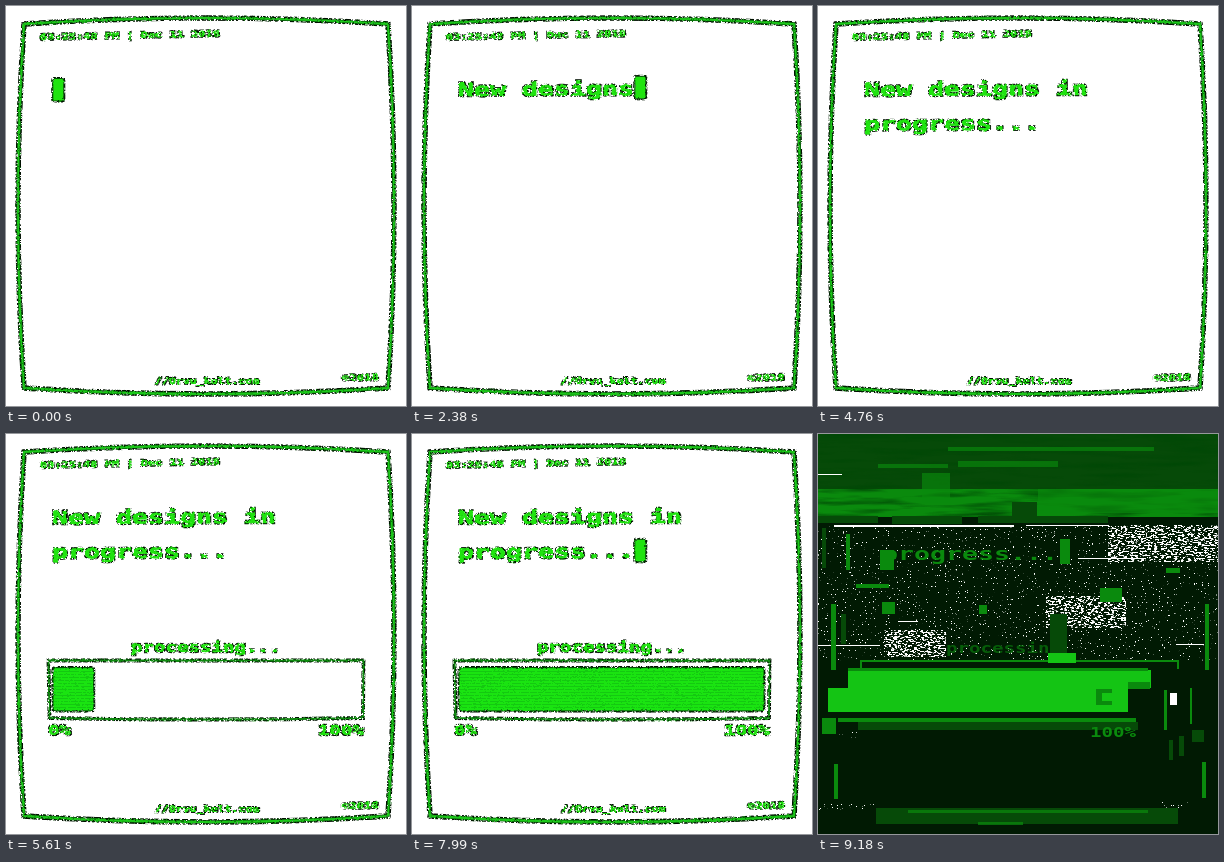
These frames come from a looping animation (400 by 400 pixels, 9350 ms). An HTML page without scripts:

```html
<!DOCTYPE html>
<html lang="en">
<head>
<meta charset="utf-8">
<title>Terminal progress</title>
<style>
@property --n { syntax: "<integer>"; inherits: true; initial-value: 0; }
html, body { margin: 0; width: 100%; height: 100%; overflow: hidden; background: #fff; }
svg { display: block; width: 100vw; height: 100vh; }

/* --n counts typed characters: 14 on line one, a space, 11 on line two */
#stage {
  --one: clamp(0, var(--n), 14);
  --two: clamp(0, var(--n) - 15, 11);
  --row: clamp(0, var(--n) - 14, 1);
  --col: (var(--one) * (1 - var(--row)) + var(--two) * var(--row));
  animation: type 9.35s infinite;
}
@keyframes type {
  0%, 9.08% { --n: -1; animation-timing-function: steps(21); }
  47.26%, 100% { --n: 27; }
}
text { font: bold 18.5px "DejaVu Sans Mono", monospace; white-space: pre; }
.w { transform: scaleX(1.437); }
.ink { fill: #20e410; }
.ink text { stroke: #20e410; stroke-width: .5; }
#clip1 rect { width: calc(16px * var(--one)); }
#clip2 rect { width: calc(16px * var(--two)); }
#cursor {
  transform: translate(calc(16px * var(--col)), calc(35px * var(--row) - .2px * var(--col)));
  animation: blink 9.35s step-end infinite;
}
@keyframes blink {
  0%, 9.08%, 52.72%, 63.63%, 74.54%, 85.45% { visibility: visible; }
  5.45%, 47.27%, 58.18%, 69.09%, 80%, 90.9%, 100% { visibility: hidden; }
}
#panel { animation: panel 9.35s step-end infinite; }
@keyframes panel { 0% { visibility: hidden; } 54.54%, 100% { visibility: visible; } }
#bar { animation: fill 9.35s infinite; }
@keyframes fill {
  0%, 56.34% { width: 0; animation-timing-function: step-end; }
  56.35% { width: 3px; animation-timing-function: steps(16); }
  85.44%, 100% { width: 305px; }
}
.glitch { animation: 9.35s step-end infinite; opacity: 0; }
#burst { animation-name: burst; }
#shift { animation-name: shift; }
#decay { animation-name: decay; }
@keyframes burst { 0%, 96.36%, 100% { opacity: 0; } 92.72% { opacity: 1; } }
@keyframes shift { 0%, 98.18%, 100% { opacity: 0; } 96.36% { opacity: 1; } }
@keyframes decay { 0% { opacity: 0; } 98.18%, 100% { opacity: 1; } }
.void { fill: #011a03; }
.deep { fill: #064a08; }
.mid { fill: #0a8a0d; }
.lit { fill: #14c414; }
</style>
</head>
<body>
<svg id="stage" viewBox="0 0 400 400">
<defs>
  <clipPath id="clip1"><rect x="46" y="64" height="36"/></clipPath>
  <clipPath id="clip2"><rect x="46" y="101" height="36"/></clipPath>
  <clipPath id="upper"><rect width="400" height="205"/></clipPath>
  <pattern id="scan" width="4" height="3" patternUnits="userSpaceOnUse">
    <rect width="4" height="3" fill="#1ae411"/><rect width="4" height="1" fill="#14c911"/>
  </pattern>

  <!-- ragged black rim that flickers -->
  <filter id="fuzz" filterUnits="userSpaceOnUse" x="0" y="0" width="400" height="400" color-interpolation-filters="sRGB">
    <feTurbulence type="fractalNoise" baseFrequency=".45" numOctaves="2" result="noise">
      <animate attributeName="seed" values="1;2;3;4;5" dur=".85s" calcMode="discrete" repeatCount="indefinite"/>
    </feTurbulence>
    <feColorMatrix in="noise" values="0 0 0 0 0  0 0 0 0 .06  0 0 0 0 0  14 0 0 0 -6.2" result="grain"/>
    <feMorphology in="SourceAlpha" operator="dilate" radius="1.4" result="wide"/>
    <feComposite in="grain" in2="wide" operator="in" result="rim"/>
    <feDisplacementMap in="SourceGraphic" in2="noise" scale="3" xChannelSelector="R" yChannelSelector="G" result="core"/>
    <feMerge><feMergeNode in="rim"/><feMergeNode in="core"/></feMerge>
  </filter>

  <!-- white specks: few, many -->
  <filter id="few" x="0" y="0" width="1" height="1" color-interpolation-filters="sRGB">
    <feTurbulence type="fractalNoise" baseFrequency=".63" numOctaves="2" seed="8"/>
    <feColorMatrix values="0 0 0 0 1  0 0 0 0 1  0 0 0 0 1  20 0 0 0 -14.2"/>
    <feComposite in2="SourceGraphic" operator="in"/>
  </filter>
  <filter id="many" x="0" y="0" width="1" height="1" color-interpolation-filters="sRGB">
    <feTurbulence type="fractalNoise" baseFrequency=".3 .7" numOctaves="2" seed="3"/>
    <feColorMatrix values="0 0 0 0 1  0 0 0 0 1  0 0 0 0 1  20 0 0 0 -10.4"/>
    <feComposite in2="SourceGraphic" operator="in"/>
  </filter>
  <!-- streaks smeared over green bands -->
  <filter id="smear" x="0" y="0" width="1" height="1" color-interpolation-filters="sRGB">
    <feTurbulence type="fractalNoise" baseFrequency=".015 .14" numOctaves="3" seed="5"/>
    <feColorMatrix values="0 0 0 0 0  0 0 0 0 .28  0 0 0 0 .02  2.4 0 0 0 -1.1"/>
    <feComposite in2="SourceGraphic" operator="in" result="dark"/>
    <feMerge><feMergeNode in="SourceGraphic"/><feMergeNode in="dark"/></feMerge>
  </filter>
  <path id="frame" d="M18 18Q200 6 382 18Q394 200 382 382Q200 394 18 382Q6 200 18 18Z" fill="none" stroke-linejoin="round"/>
</defs>

<rect width="400" height="400" fill="#fff"/>

<g filter="url(#fuzz)" class="ink">
  <use href="#frame" stroke="#075a08" stroke-width="3.4"/>
  <use href="#frame" stroke="#1cc81a" stroke-width="1.8"/>
  <g id="clock" transform="translate(34 34) rotate(-1.2) scale(.45)"><text class="w">03:25:48 PM | Dec 11 2018</text></g>
  <g transform="translate(149 378) scale(.435)"><text class="w">//Orvu_kelt.com</text></g>
  <g transform="translate(336 375) rotate(-1.3) scale(.46)"><text class="w">©2018</text></g>

  <g clip-path="url(#clip1)"><g transform="translate(46 90) rotate(-.3)"><text class="w">New designs in</text></g></g>
  <g clip-path="url(#clip2)"><g transform="translate(46 124.5) rotate(-.3)"><text class="w">progress...</text></g></g>
  <rect id="cursor" x="46.8" y="72.5" width="11" height="22.5" rx="2" stroke="#064a08"/>

  <g id="panel">
    <g transform="translate(125 218) scale(.72)"><text class="w">processing...</text></g>
    <path d="M42.5 226.5H357.5L357 284Q200 287 43.5 284Z" fill="none" stroke="#0f8a10" stroke-width="1.8"/>
    <rect id="bar" x="47" y="233.5" height="43.5" rx="3" fill="url(#scan)" stroke="#064a08"/>
    <g transform="translate(42 301) scale(.72)"><text class="w">0%</text></g>
    <g transform="translate(312 301) scale(.72)"><text class="w">100%</text></g>
  </g>
</g>

<g id="burst" class="glitch">
  <g id="torn">
    <rect class="void" width="400" height="400"/>
    <g fill="#fff">
      <rect width="335" height="32" filter="url(#many)"/>
      <path d="M100 4h64v24h-64zM230 0h92v24h-92zM34 14h34v12h-34z" opacity=".8"/>
      <rect x="40" y="32" width="290" height="18" filter="url(#few)"/>
      <path d="M378 0h22v32h-22z" filter="url(#many)"/>
      <rect x="12" y="206" width="365" height="17" filter="url(#many)"/>
      <path d="M28 208h85v10h-85zM270 210h80v8h-80z" opacity=".55"/>
      <rect x="14" y="223" width="374" height="36" filter="url(#few)"/>
      <rect x="40" y="268" width="350" height="74" filter="url(#few)"/>
      <rect x="66" y="293" width="62" height="26" filter="url(#many)"/>
    </g>
    <path class="deep" d="M337 0h11v54h-11zM363 0h10v54h-10zM0 45h115v7h-115zM125 40h95v12h-95z"/>
    <path class="mid" d="M115 51h285v10h-285zM0 66h400v10h-400z"/>
    <path class="lit" d="M113 58h183v16h-183zM0 68h113v6h-113z" opacity=".75"/>
    <path class="deep" d="M0 74h400v18h-400z"/>
    <path class="void" d="M290 68h97v6h-97zM0 88h400v3h-400z" opacity=".6"/>
    <rect class="lit" y="92" width="400" height="113" filter="url(#smear)"/>
    <rect class="lit" y="95" width="400" height="108" opacity=".6"/>
    <path d="M0 96H390M24 98V138M57 98V138M18 140L11 170M44 172V202M18 172V202M35 160L120 146" fill="none" stroke="#087a0a" stroke-width="2"/>
    <g fill="#07690a">
      <g transform="translate(75 110) scale(.45)"><text class="w">03:25:48 PM | Dec 11 2018</text></g>
      <g transform="translate(76 149) scale(.78)"><text class="w">New designs in</text></g>
      <path d="M76 143h178v5h-178zM275 141h30v6h-30z" opacity=".7"/>
    </g>
    <path class="mid" d="M38 236h305v22h-305z" opacity=".8"/>
    <path class="deep" d="M4 206h8v52h-8zM38 229h305v7h-305zM374 212h13v46h-13zM113 213h130v9h-130z"/>
    <path class="void" d="M243 232h64v22h-64z"/>
    <path class="mid" d="M120 258h280v12h-280zM332 266h68v17h-68zM355 280h32v11h-32zM0 266h28v12h-28zM118 262h25v19h-25z"/>
    <path class="lit" d="M332 258h55v10h-55z" opacity=".6"/>
    <path d="M40 260V310M60 260V290M86 266V318M16 318V334" fill="none" stroke="#0a7a0d" stroke-width="2"/>
    <path class="deep" d="M0 335h400v9h-400z"/>
    <rect class="lit" y="342" width="400" height="58" filter="url(#smear)"/>
    <rect class="lit" y="350" width="400" height="46" opacity=".6"/>
    <path d="M135 347H275M70 396H200" stroke="#087a0a" stroke-width="3" stroke-dasharray="9 4 15 5"/>
    <path d="M44 346V360M76 348V364M27 364V400" stroke="#087a0a" stroke-width="2"/>
  </g>
</g>

<g id="decay" class="glitch">
  <g id="ruin">
    <rect class="void" width="400" height="400"/>
    <rect class="deep" width="400" height="56" filter="url(#smear)"/>
    <rect class="mid" y="55" width="400" height="28" filter="url(#smear)"/>
    <path class="mid" d="M104 39h28v30h-28zM220 55h180v24h-180zM130 13h206v4h-206zM60 30h70v4h-70zM140 27h100v6h-100z" opacity=".65"/>
    <path class="deep" d="M194 68h25v16h-25zM0 82h60v7h-60zM74 82h70v8h-70zM160 82h130v7h-130z"/>
    <g fill="#fff">
      <rect y="92" width="400" height="135" filter="url(#few)"/>
      <rect x="290" y="91" width="110" height="37" filter="url(#many)"/>
      <rect x="228" y="162" width="80" height="32" filter="url(#many)"/>
      <rect x="66" y="196" width="62" height="27" filter="url(#many)"/>
      <path d="M0 40h24v1h-24zM16 91h180v2h-180zM208 91h82v1h-82zM260 124h64v1h-64zM0 211h62v1h-62zM358 210h28v1h-28zM80 187h20v1h-20zM352 259h7v12h-7z"/>
      <path d="M0 370h56v6h-56zM340 368h36v8h-36zM20 296h20v10h-20z" filter="url(#few)"/>
    </g>
    <g class="mid">
      <g transform="translate(64 126)"><text class="w">progress...</text></g>
      <path d="M62 116h14v20h-14zM242 105h10v25h-10zM282 154h22v14h-22zM64 168h13v12h-13zM161 171h8v9h-8zM28 100h4v36h-4zM38 150h33v4h-33zM348 134h14v5h-14z"/>
      <path d="M13 170h5v66h-5zM387 170h4v66h-4zM16 330h4v35h-4zM384 328h4v36h-4zM346 256h3v40h-3zM372 254h2v36h-2z"/>
      <g transform="translate(128 219) scale(.72)" opacity=".6"><text class="w">processin</text></g>
      <path d="M43 235V227H360V235" fill="none" stroke="#0a8a0d" stroke-width="2"/>
    </g>
    <path class="deep" d="M232 180h17v40h-17zM4 94h4v40h-4zM23 180h5v30h-5z"/>
    <path class="lit" d="M230 219h28v10h-28zM30 236h303v18h-303zM10 254h300v24h-300z"/>
    <path class="mid" d="M30 234h300v3h-300zM278 255h16v16h-16zM310 248h22v7h-22zM20 284h298v4h-298zM4 284h14v16h-14z"/>
    <path class="lit" d="M284 259h10v8h-10z"/>
    <path class="deep" d="M40 288h280v8h-280zM351 306h4v20h-4zM361 302h5v20h-5zM374 296h12v12h-12z"/>
    <g class="mid" transform="translate(272 303) scale(.72)"><text class="w">100%</text></g>
    <path class="deep" d="M58 374h302v16h-302z"/>
    <path class="mid" d="M90 376h240v3h-240zM160 388h45v3h-45z" opacity=".7"/>
  </g>
</g>

<g id="shift" class="glitch">
  <use href="#ruin"/>
  <g clip-path="url(#upper)"><use href="#torn" y="-22"/></g>
</g>
</svg>
</body>
</html>
```
